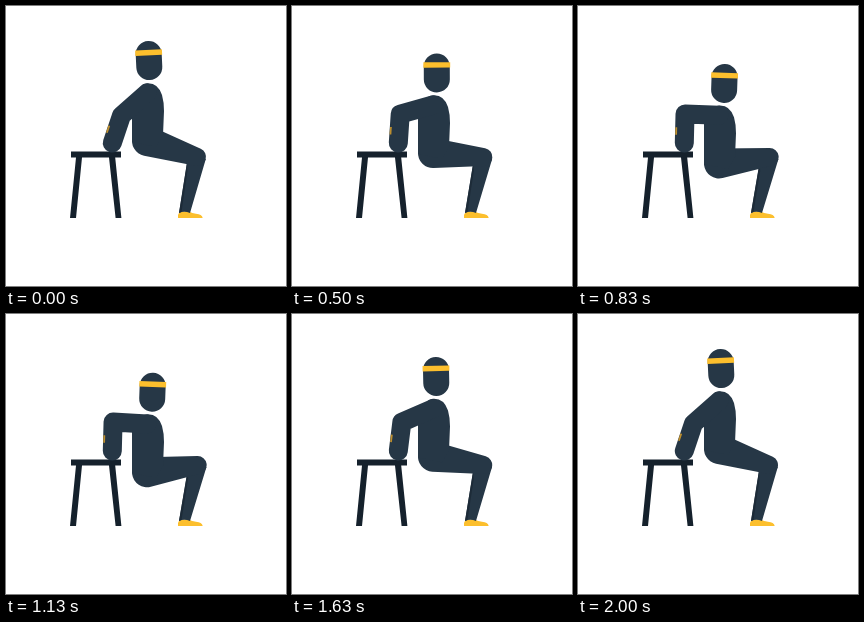
An HTML page for the animation above (2.04 s loop, 280x280 px).

```html
<!DOCTYPE html>
<html lang="en">
<head>
<meta charset="utf-8">
<title>Bench dips</title>
<style>
  html, body { margin: 0; width: 100%; height: 100%; overflow: hidden; background: #fff; }
  svg { display: block; width: 100vw; height: 100vh; }
  .body { fill: #263746; }
  .limb { fill: none; stroke: #263746; stroke-width: 19; stroke-linecap: round; stroke-linejoin: round; }
  .shade { fill: #1d2b38; }
  .bench { fill: #15212c; }
  .gold { fill: #fcbf2d; }
  .strap { stroke: #bd8f2f; stroke-width: 1.8; }
</style>
</head>
<body>
<svg viewBox="0 0 280 280">
  <path class="bench" d="M65 145.5H115V151.5H109.2L115.4 212H109.6L103 151.5H76L70 212H64L70 151.5H65Z"/>
  <path class="gold" d="M172 212V209Q173 205.5 177 205.5H183Q186 207.5 190 207.8Q196 208.3 196.7 212Z"/>
  <path id="shin" class="body"/>
  <path id="crease" class="shade"/>
  <path id="thigh" class="body"/>
  <path id="torso" class="body"
    d="M126 8L134 -5Q136 -9.5 141 -9.8Q152 -10.5 156 2Q158 9 158 18L157 42L150 54L126 49Z"/>
  <path id="arm" class="limb"/>
  <path id="strap" class="strap"/>
  <g id="head">
    <rect class="body" x="-13" y="-19.5" width="26" height="39" rx="13"/>
    <rect class="gold" x="-13.4" y="-10.7" width="26.8" height="5.4"/>
  </g>
</svg>
<script>
const LOOP = 2040, HALF = 24, STEP = 1000 / 24;
const HAND = { x: 106.3, y: 137 };
const UPPER = 34, FORE = 29;
const $ = id => document.getElementById(id);
const set = (id, name, value) => $(id).setAttribute(name, value);
const pt = (x, y) => x.toFixed(2) + ' ' + y.toFixed(2);
const mix = (a, b, p) => a + (b - a) * p;

// Two circles joined by their outer tangents
function taper(a, ra, b, rb) {
  const dx = b.x - a.x, dy = b.y - a.y;
  const dir = Math.atan2(dy, dx), spread = Math.acos((ra - rb) / Math.hypot(dx, dy));
  const on = (c, r, t) => pt(c.x + r * Math.cos(t), c.y + r * Math.sin(t));
  const up = dir - spread, low = dir + spread;
  return `M${on(a, ra, up)}L${on(b, rb, up)}A${rb} ${rb} 0 0 1 ${on(b, rb, low)}` +
         `L${on(a, ra, low)}A${ra} ${ra} 0 1 1 ${on(a, ra, up)}Z`;
}

function elbowOf(s) {
  const dx = HAND.x - s.x, dy = HAND.y - s.y, d = Math.hypot(dx, dy);
  const along = (UPPER ** 2 - FORE ** 2 + d * d) / (2 * d);
  const bulge = Math.sqrt(Math.max(0, UPPER ** 2 - along ** 2));
  return { x: s.x + (dx * along - dy * bulge) / d, y: s.y + (dy * along + dx * bulge) / d };
}

function pose(p) {
  const shoulder = { x: 141, y: 87 + 24 * p };
  const hip = { x: 141, y: 135 + 24.2 * p };
  const knee = { x: 191 + 0.7 * p, y: 151 };
  const elbow = elbowOf(shoulder);

  set('torso', 'transform', `translate(0 ${shoulder.y})`);
  set('thigh', 'd', taper(hip, 15, knee, 9));
  set('shin', 'd', `M${pt(knee.x - 9, 150)}L173 207Q178 204.5 184 207L${pt(knee.x + 8.8, 153)}Z`);
  set('crease', 'd', `M${pt(knee.x - 10, 157)}L173 207L175.5 206L${pt(knee.x - 9.5, 165)}Z`);
  set('arm', 'd', `M${pt(shoulder.x, shoulder.y)}L${pt(elbow.x, elbow.y)}L${pt(HAND.x, HAND.y)}`);

  const ux = (HAND.x - elbow.x) / FORE, uy = (HAND.y - elbow.y) / FORE;
  const edge = s => pt(elbow.x + ux * s - uy * 8.4, elbow.y + uy * s + ux * 8.4);
  set('strap', 'd', `M${edge(13.5)}L${edge(21)}`);

  set('head', 'transform',
    `translate(${mix(143, 146.6, p)} ${mix(54.6, 79.3, p)}) rotate(${mix(-2.7, 2.3, p)})`);
}

// 24 steps down and 24 up, eased, on a 10 ms clock
function draw() {
  const t = Math.floor(performance.now() % LOOP / 10) * 10;
  const k = Math.min(2 * HALF, Math.floor((t + 4.9) / STEP));
  const x = 1 - Math.abs(k / HALF - 1);
  pose(x * x * (3 - 2 * x));
  requestAnimationFrame(draw);
}
draw();
</script>
</body>
</html>
```
